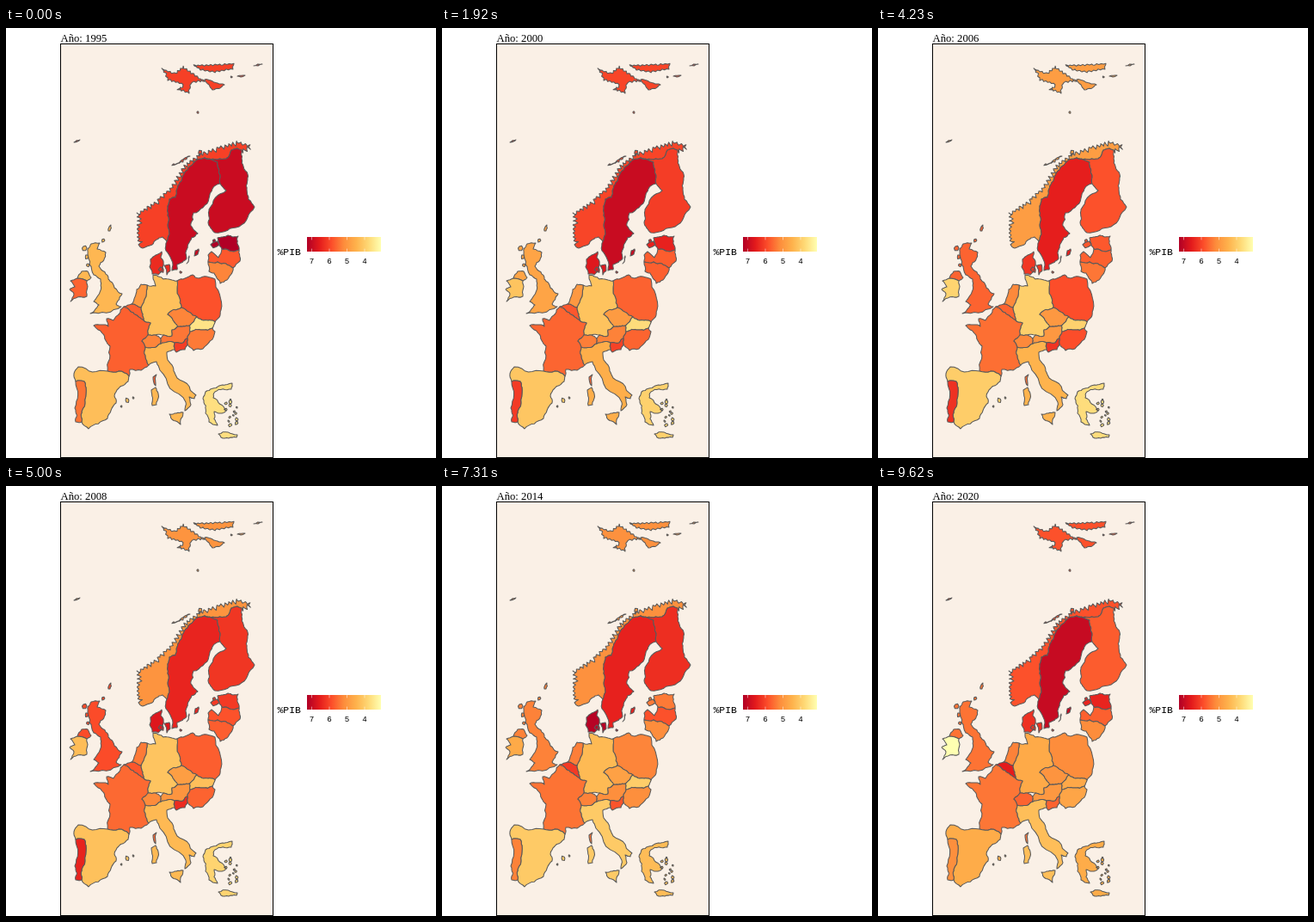
These frames come from a looping animation (500 px wide and 500 px high, 10000 ms). An HTML page:

```html
<!DOCTYPE html>
<html lang="es">
<head>
<meta charset="utf-8">
<style>
  html, body { margin: 0; width: 100%; height: 100%; overflow: hidden; background: #fff; }
  svg { display: block; width: 100vw; height: 100vh; }
  .land { stroke: #595959; stroke-width: 1.05; stroke-linejoin: round; }
  .title { font: 12.7px "Liberation Serif", serif; }
  .legend { font: 11.4px "Liberation Mono", monospace; }
  .tick { font: 9.2px "Liberation Mono", monospace; text-anchor: middle; }
</style>
</head>
<body>
<svg viewBox="0 0 500 500">
  <defs><linearGradient id="scale"></linearGradient></defs>
  <text class="title" id="year" x="63.5" y="16"></text>
  <rect x="63.5" y="18.5" width="247" height="481" fill="#faf0e6"/>
  <g id="map"></g>
  <rect x="63.5" y="18.5" width="247" height="481" fill="none" stroke="#000"/>
  <text class="legend" x="315.5" y="264">%PIB</text>
  <rect x="350" y="243" width="86" height="17" fill="url(#scale)"/>
  <g id="ticks"></g>
</svg>
<script>
const LOOP = 10000, FIRST_YEAR = 1995, YEARS = 26;
const palette = ['#ffffb2', '#fed976', '#feb24c', '#fd8d3c', '#fc4e2a', '#e31a1c', '#b10026'];
const keyYears = [1995, 1998, 2003, 2006, 2010, 2014, 2020];
const countries = [];

const noise = seed => {
  const n = Math.sin(seed) * 43758.5;
  return n - Math.floor(n);
};

function add(parent, tag, attributes, text = '') {
  const node = document.createElementNS('http://www.w3.org/2000/svg', tag);
  for (const name in attributes) node.setAttribute(name, attributes[name]);
  node.textContent = text;
  return document.getElementById(parent).appendChild(node);
}

// Both neighbours of a border get the same bends: the sign follows the order of the ends.
function roughen([ax, ay], [bx, by], depth = 3) {
  if (!depth || Math.hypot(bx - ax, by - ay) < 3) return [[ax, ay]];
  const sign = ax < bx || (ax === bx && ay < by) ? 1 : -1;
  const bend = (noise((ax + bx) * 12.99 + (ay + by) * 78.23) - .5) * .26 * sign;
  const mid = [(ax + bx) / 2 - (by - ay) * bend, (ay + by) / 2 + (bx - ax) * bend];
  return [...roughen([ax, ay], mid, depth - 1), ...roughen(mid, [bx, by], depth - 1)];
}

const parse = text => text.trim().split(/\s+/).map(p => p.split(',').map(Number));

// Cuts narrow inlets to the left of the direction of travel.
function fjords(text, reach) {
  const points = parse(text);
  return points.slice(0, -1).flatMap(([ax, ay], i) => {
    const [bx, by] = points[i + 1];
    const length = Math.hypot(bx - ax, by - ay);
    const count = Math.max(2, 2 * Math.round(length / 5));
    return Array.from({ length: count }, (_, k) => {
      const cut = (k % 2 ? .4 + noise(ax * 7 + k * 3) * .6 : noise(ay + k) * .15) * reach / length;
      return [ax + (bx - ax) * k / count + (by - ay) * cut, ay + (by - ay) * k / count - (bx - ax) * cut];
    });
  }).join(' ') + ' ' + points.at(-1);
}

// An islet is written "x,y,radius".
function islet([x, y, r]) {
  return Array.from({ length: 6 }, (_, k) => {
    const size = r * (.6 + .7 * noise(x * 3 + y + k));
    return [x + size * Math.cos(k * 1.05), y + size * Math.sin(k * 1.05)];
  });
}

function outline(shape) {
  const points = parse(shape);
  const rough = points[0].length === 3
    ? islet(points[0])
    : points.flatMap((p, i) => roughen(p, points[(i + 1) % points.length]));
  return 'M' + rough.map(p => p.map(n => n.toFixed(1))).join(' ') + 'z';
}

// Ways to cross the last span of years
const steady = t => t, late = t => Math.floor(t), early = t => Math.ceil(t);

// levels: position on the palette (0-100) at each key year
function land(levels, lastSpan, ...shapes) {
  const node = add('map', 'path', { class: 'land', d: shapes.map(outline).join('') });
  countries.push({ node, levels, lastSpan });
}

const scandes = '187,248 190,240 188,218 188,207 190,199 197,197 201,182 211,165 218,157 231,151';
const lapland = '246,153 256,152 262,142 269,140 274,142';
const bothnia = '249,181 249,171 246,156';
const northCape = '276,146 285,141 284,135 268,131 245,138 225,145 206,159 190,186 172,202 152,215 152,243 154,252';

// Norway
land([71, 70, 69, 43, 51, 48, 66], steady,
  `${scandes} ${lapland} ${fjords(northCape, 6)} 159,256 170,252 182,243`,
  fjords('193,160 206,156 214,149', 2), '226,145,2.5',
  fjords('231,62 206,44 196,52 181,47 188,61 206,66 199,72 213,76 216,64 231,62', 2.5),
  fjords('265,41 243,42 218,43 226,49 243,52 264,48', 2), '231,60 238,61 254,66 240,72',
  '288,44 298,42 293,44', '269,56 278,55 273,57', '262,57,1', '223,98,1.2', '79,133 86,130 83,132');
// Sweden
land([92, 96, 87, 82, 78, 81, 93], steady,
  `${scandes} 246,156 249,171 249,181 240,187 236,198 218,215 215,230 223,239 212,251 210,268 199,275 199,281 193,282 186,259`,
  '219,265 220,259 224,257 223,263', '210,274 213,265 212,272');
// Finland
land([92, 70, 75, 66, 83, 77, 63], steady,
  `231,151 ${lapland} 274,152 281,170 280,188 289,208 271,231 243,238 235,226 236,211 256,189 ${bothnia}`);
// Denmark
land([78, 85, 84, 74, 97, 98, 76], steady,
  '181,260 180,267 183,271 177,287 170,286 168,269', '184,276 190,275 191,282 187,287', '181,281,3', '203,284,1.5');
// Estonia
land([100, 87, 72, 64, 82, 55, 80], steady,
  '246,244 258,241 270,242 271,258 265,260 251,257 247,249', '243,252,4', '242,247,2');
// Latvia
land([64, 68, 55, 62, 69, 66, 62], steady,
  '235,272 235,264 239,260 247,267 251,257 265,260 271,258 272,271 264,279 246,272');
// Lithuania
land([52, 63, 61, 56, 69, 50, 50], steady, '235,272 246,272 264,279 257,293 249,297 242,285 236,283');
// Poland
land([66, 55, 71, 67, 58, 52, 50], steady,
  '199,294 217,287 224,291 243,292 250,328 243,342 230,340 222,336 204,325 199,303');
// Germany
land([27, 26, 26, 21, 30, 30, 37], steady,
  `171,287 183,292 199,294 199,303 204,325 188,333 200,347 193,351 193,358 183,357 174,357 165,357
  168,343 160,340 157,325 164,299 174,300`);
// Netherlands
land([44, 42, 50, 51, 59, 54, 53], steady, '157,325 164,299 157,298 152,304 146,321');
// Belgium
land([62, 63, 66, 61, 68, 73, 83], steady, '137,324 146,321 157,325 160,340 148,331');
// France
land([62, 59, 63, 58, 61, 57, 56], late,
  `102,346 119,347 117,338 125,340 137,324 148,331 160,340 168,343 165,357 158,364 162,371 161,379
  166,392 157,398 144,397 143,405 118,399 121,370 112,355`, '171,406 175,403 174,416');
// Spain
land([28, 27, 21, 22, 32, 23, 36], late,
  `79,402 84,394 118,399 143,405 142,411 131,419 126,428 128,436 118,454 96,466 88,458
  88,446 93,418 91,411 81,411`, '141,433,2.5', '134,440,1', '148,430,1');
// Portugal
land([57, 67, 81, 76, 85, 53, 49], late, '81,411 91,411 93,418 88,446 88,458 81,458 80,442');
// Italy
land([31, 34, 37, 33, 28, 23, 28], late,
  `161,379 162,371 174,371 180,367 196,366 196,374 187,377 188,386 197,403 221,427 219,431 213,429
  215,438 208,445 209,435 179,398 175,388 166,392`,
  '190,449 206,447 203,461', '169,421 174,418 177,425 175,438 170,439');
// Switzerland
land([52, 52, 57, 51, 50, 53, 61], steady, '158,364 165,357 174,357 180,361 180,367 174,371 162,371');
// Austria
land([56, 54, 51, 45, 48, 49, 45], steady,
  '180,367 180,361 183,357 193,358 193,351 200,347 213,346 214,353 211,361 206,366 196,366');
// Czechia
land([52, 39, 51, 45, 40, 41, 47], steady, '188,333 204,325 222,336 213,346 200,347');
// Slovakia
land([12, 4, 32, 20, 35, 22, 38], steady, '213,346 222,336 230,340 243,342 240,349 228,351 214,353');
// Hungary
land([55, 50, 77, 67, 55, 49, 39], steady, '214,353 228,351 240,349 243,353 229,373 218,375 211,368 211,361');
// Slovenia
land([72, 69, 73, 75, 80, 65, 61], steady, '196,366 206,366 211,361 211,368 208,374 198,377 196,374');
// United Kingdom
land([31, 26, 60, 61, 74, 53, 57], steady,
  `99,251 109,250 106,257 116,261 108,277 119,292 126,302 135,309 128,321 134,324 98,332 108,322 102,318
  107,311 110,292 102,287 95,262`, '83,291 88,283 95,283 99,290 94,294',
  '91,256,3', '94,266,2.5', '95,276,2', '113,247,2', '119,236 122,229 121,236');
// Ireland
land([61, 28, 22, 19, 38, 37, 0], early, '83,291 94,294 94,312 75,318 79,309 74,304 80,301 75,294');
// Greece, with the Aegean islands scattered
land([14, 15, 28, 15, 23, 29, 36], late,
  `229,431 232,423 248,416 263,413 262,420 243,423 241,430 256,445 249,448 242,446 246,462 236,458 232,448`,
  '247,472 269,473 268,476 250,476',
  ...Array.from({ length: 14 }, (_, k) => [252 + 18 * noise(k + 1), 432 + k * 2.3, .8 + 1.3 * noise(k * 5)].join()));

const channels = hex => [1, 3, 5].map(i => parseInt(hex.slice(i, i + 2), 16));

function colour(level) {
  const pos = level / 100 * (palette.length - 1);
  const i = Math.min(Math.floor(pos), palette.length - 2);
  const to = channels(palette[i + 1]);
  return `rgb(${channels(palette[i]).map((c, k) => Math.round(c + (to[k] - c) * (pos - i)))})`;
}

function levelAt({ levels, lastSpan }, year) {
  const i = Math.max(1, keyYears.findIndex(k => k >= year));
  const part = (year - keyYears[i - 1]) / (keyYears[i] - keyYears[i - 1]);
  const eased = i === keyYears.length - 1 ? lastSpan(part) : part;
  return levels[i - 1] + (levels[i] - levels[i - 1]) * eased;
}

[...palette].reverse().forEach((c, i) =>
  add('scale', 'stop', { offset: i / (palette.length - 1), 'stop-color': c }));

[7, 6, 5, 4].forEach((value, i) => {
  const x = 355.5 + i * 20.5;
  add('ticks', 'path', { d: `M${x} 243v3.4M${x} 256.6v3.4`, stroke: '#fff', 'stroke-width': .5 });
  add('ticks', 'text', { class: 'tick', x, y: 274 }, value);
});

let shown;
function draw(year) {
  if (year === shown) return;
  shown = year;
  document.getElementById('year').textContent = `Año: ${year}`;
  for (const country of countries) country.node.setAttribute('fill', colour(levelAt(country, year)));
}

// Year changes fall on whole hundredths of a second.
const start = performance.now();
function tick() {
  const hundredths = Math.floor((performance.now() - start) % LOOP / 10);
  const step = Math.floor((hundredths + .5) * YEARS * 10 / LOOP);
  draw(FIRST_YEAR + Math.min(step, YEARS - 1));
  requestAnimationFrame(tick);
}
tick();
</script>
</body>
</html>
```
